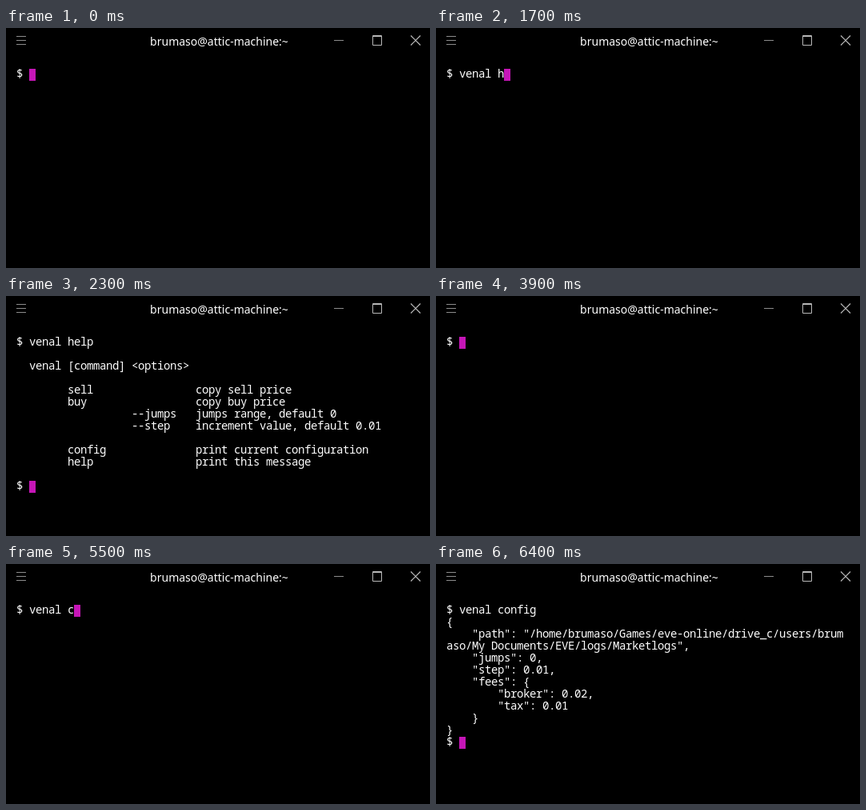
An HTML page that plays this animation: 530 by 300 pixels, repeating every 8 s.

```html
<!DOCTYPE html>
<html lang="en">
<head>
<meta charset="utf-8">
<title>Terminal</title>
<style>
  html, body { margin: 0; width: 100%; height: 100%; overflow: hidden; background: #000; }
  svg { display: block; width: 530px; height: 300px; }
  text { fill: #fff; white-space: pre; }
  #title { font: 14px "Noto Sans", sans-serif; text-anchor: middle; }
  #rows text { font: 500 14px "Noto Sans Mono", monospace; letter-spacing: -.4px; }
  #icons { fill: none; stroke: #8c8c8c; }
  #icons .bright { stroke: #b8b8b8; }
</style>
</head>
<body>
<svg viewBox="0 0 530 300">
  <g id="icons">
    <path d="M13 10.5h12M13 15.5h12M13 20.5h12M410 15.5h12"/>
    <path class="bright" d="M458.5 9.5h11v12h-11zM458 10.5h12"/>
    <path class="bright" stroke-width="1.2" d="M506 9.5l12 12m0 -12l-12 12"/>
  </g>
  <text id="title" x="266.5" y="22">brumaso@attic-machine:~</text>
  <rect id="cursor" width="8" height="15" fill="#c616b7"/>
  <g id="rows"></g>
</svg>
<script>
const LOOP = 8000, LEFT = 13, TOP = 51, CELL = 8, LINE = 15, COLS = 62;
const cursor = document.getElementById('cursor');
const group = document.getElementById('rows');

const rows = Array.from({ length: 13 }, (_, i) => {
  const row = document.createElementNS('http://www.w3.org/2000/svg', 'text');
  row.setAttribute('x', LEFT);
  row.setAttribute('y', TOP + 11 + i * LINE);
  return group.appendChild(row);
});

const entry = (name, flag, info) =>
  (' '.repeat(8) + name).padEnd(18).concat(flag).padEnd(28) + info;

const help = [
  '',
  '  venal [command] <options>',
  '',
  entry('sell', '', 'copy sell price'),
  entry('buy', '', 'copy buy price'),
  entry('', '--jumps', 'jumps range, default 0'),
  entry('', '--step', 'increment value, default 0.01'),
  '',
  entry('config', '', 'print current configuration'),
  entry('help', '', 'print this message'),
  ''
];

const config = JSON.stringify({
  path: '/home/brumaso/Games/eve-online/drive_c/users/brumaso/My Documents/EVE/logs/Marketlogs',
  jumps: 0,
  step: 0.01,
  fees: { broker: 0.02, tax: 0.01 }
}, null, 4).split('\n').flatMap(s => s.match(new RegExp(`.{1,${COLS}}`, 'g')));

// Each session: key times (ms), Enter time, output time.
const sessions = [
  { start: 0, command: 'venal help', output: help, enter: 2200, print: 2300,
    keys: [800, 800, 900, 1000, 1100, 1300, 1700, 1800, 1900, 2000] },
  { start: 3900, command: 'venal config', output: config, enter: 6400, print: 6400,
    keys: [4800, 4800, 5000, 5100, 5300, 5400, 5500, 5600, 5700, 5800, 5900, 6000] }
];

function screen(t) {
  const s = sessions.findLast(s => t >= s.start);
  const typed = s.keys.filter(k => t >= k).length;
  const lines = ['$ ' + s.command.slice(0, typed)];
  if (t >= s.print) lines.push(...s.output, '$ ');
  else if (t >= s.enter) lines.push('');
  return lines;
}

let shown;
function draw(now) {
  const lines = screen(now % LOOP);
  const key = lines.join('\n');
  if (key !== shown) {
    shown = key;
    rows.forEach((row, i) => row.textContent = lines[i] || '');
    const last = lines.length - 1;
    cursor.setAttribute('x', LEFT + lines[last].length * CELL);
    cursor.setAttribute('y', TOP + last * LINE);
  }
  requestAnimationFrame(draw);
}
draw(performance.now());
</script>
</body>
</html>
```
